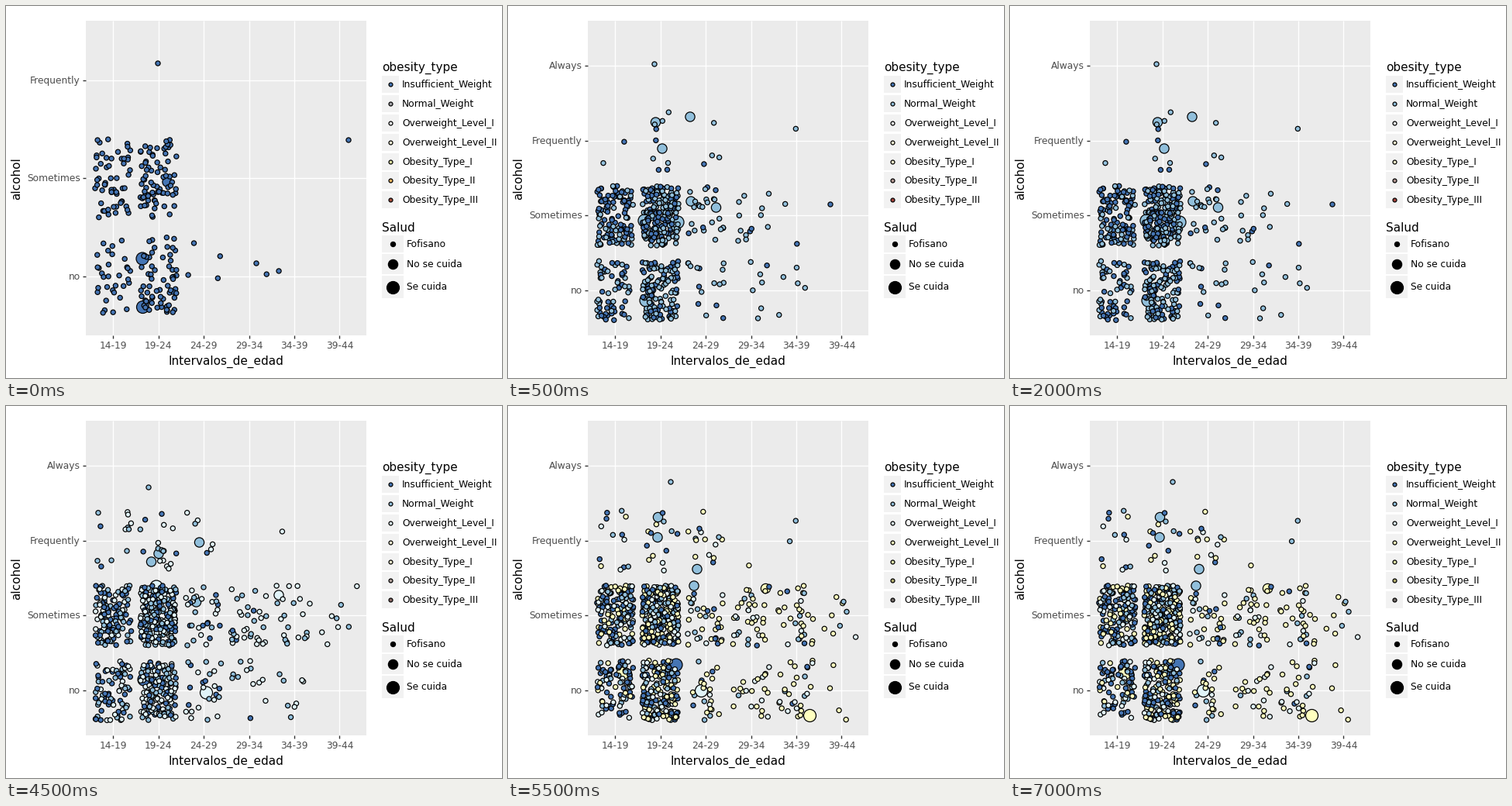
A matplotlib script that plays this animation: 640 by 480 pixels, repeating every 8 s.

```python
import numpy as np
import matplotlib.pyplot as plt
from matplotlib.animation import FuncAnimation
from matplotlib.patches import Rectangle

W, H, DPI = 640, 480, 100
PX = 72 / DPI                      # points per pixel
LEFT, TOP, RIGHT, BOTTOM = 103, 19, 465, 425
STEP = 58.45                       # distance between age groups
BLUE, SKY, ICE, CREAM = "#4575b4", "#91bfdb", "#e0f3f8", "#ffffbf"
TINTS = np.array([BLUE, SKY, ICE, CREAM])
KEY, SMALL, MEDIUM, LARGE = 4.92, 6.15, 12.24, 16
EDGE = dict(markeredgecolor="black", markeredgewidth=0.886)
LEVELS = ["no", "Sometimes", "Frequently", "Always"]
AGES = ["14-19", "19-24", "24-29", "29-34", "34-39", "39-44"]
TYPES = ["Insufficient_Weight", "Normal_Weight", "Overweight_Level_I",
         "Overweight_Level_II", "Obesity_Type_I", "Obesity_Type_II",
         "Obesity_Type_III"]
ROWS_3 = np.linspace(349, 95.8, 3)
ROWS_4 = np.linspace(367, 77.2, 4)


def age_x(i):
    return 138.2 + STEP * i


def key_y(i):
    return 101.4 + 24.8 * i


def label(ax, x, y, text, size=8.8, color="black", **kw):
    kw = {"ha": "left", "va": "center_baseline", **kw}
    return ax.text(x, y, text, fontsize=size, color=color, **kw)


def line(ax, xs, ys, color):
    return ax.plot(xs, ys, color=color, lw=1, zorder=2,
                   solid_capstyle="butt")[0]


def box(ax, x, y, w, h, color):
    ax.add_patch(Rectangle((x, y), w, h, fc=color, lw=0, zorder=1))


def key_dot(ax, x, y, size, color):
    return ax.plot([x], [y], "o", markersize=size * PX, color=color,
                   zorder=3, **EDGE)[0]


def draw_dots(ax, rows, seed, counts, young, old, marks):
    """Jitter counts[level][age] dots per cell over the few fixed marks.

    The tint shares blend from young to old along the age axis.
    """
    rng = np.random.default_rng(seed)
    reach = 0.4 * np.array([STEP, rows[0] - rows[1]])
    xy = [np.array([m[:2] for m in marks])]
    tints = [np.array([m[2] for m in marks])]
    sizes = [np.array([m[3] for m in marks])]
    for level, per_age in enumerate(counts):
        for age, n in enumerate(per_age):
            t = min(age / 3, 1)
            share = (1 - t) * np.array(young) + t * np.array(old)
            pick = rng.choice(len(share), n, p=share / share.sum())
            jitter = rng.uniform(-1, 1, (n, 2)) * reach
            xy.append(jitter + [age_x(age), rows[level]])
            tints.append(TINTS[pick])
            sizes.append(np.full(n, SMALL))
    xy = np.concatenate(xy)
    return ax.scatter(xy[:, 0], xy[:, 1],
                      s=(np.concatenate(sizes) * PX) ** 2,
                      c=np.concatenate(tints), edgecolors="black",
                      linewidths=0.886, zorder=3)


def draw_rows(ax, rows):
    parts = []
    for y, name in zip(rows, LEVELS):
        parts += [line(ax, [LEFT, RIGHT], [y, y], "white"),
                  line(ax, [LEFT - 4, LEFT], [y, y], "#333333"),
                  label(ax, 96, y - 1, name, color="#4d4d4d", ha="right")]
    return parts


def draw_frame(ax):
    box(ax, LEFT, TOP, RIGHT - LEFT, BOTTOM - TOP, "#ebebeb")
    for i, name in enumerate(AGES):
        x = age_x(i)
        line(ax, [x, x], [TOP, BOTTOM], "white")
        line(ax, [x, x], [BOTTOM, BOTTOM + 4], "#333333")
        label(ax, x, 437.5, name, color="#4d4d4d", ha="center")
    label(ax, 284, 457, "Intervalos_de_edad", 11, ha="center")
    label(ax, 13.5, 222.5, "alcohol", 11, ha="center", va="center",
          rotation=90)


def draw_legend(ax):
    label(ax, 485.5, 78, "obesity_type", 11)
    for i, name in enumerate(TYPES):
        box(ax, 485, key_y(i) - 11, 22, 22, "#f2f2f2")
        label(ax, 511, key_y(i) - 1, name)
    label(ax, 485.5, 285, "Salud", 11)
    for y, h, size, name in [(307.3, 22, SMALL, "Fofisano"),
                             (333.3, 26, MEDIUM, "No se cuida"),
                             (362.5, 29, LARGE, "Se cuida")]:
        box(ax, 485, y - h / 2, 28, h, "#f2f2f2")
        key_dot(ax, 499.3, y, size, "black")
        label(ax, 517, y - 1, name)


def draw_swatches(ax, colors):
    return [key_dot(ax, 496.3, key_y(i), KEY, c)
            for i, c in enumerate(colors)]


SCENES = [
    dict(rows=ROWS_3, seed=4, young=[1], old=[1],
         counts=[[32, 66, 3, 1, 1], [56, 74]],
         marks=[(176, 326, BLUE, LARGE), (176.5, 388.5, BLUE, LARGE),
                (208, 227, BLUE, MEDIUM), (196, 74, BLUE, SMALL),
                (442, 173, BLUE, SMALL), (242.5, 306, BLUE, SMALL),
                (323, 332, BLUE, SMALL)]),
    dict(rows=ROWS_4, seed=12, young=[66, 34], old=[13, 87],
         counts=[[60, 125, 16, 7, 5], [115, 195, 24, 13, 2],
                 [2, 9, 4, 0, 1]],
         marks=[(176, 277, SKY, LARGE), (219, 279, SKY, LARGE),
                (178, 380, SKY, LARGE), (190.5, 150, SKY, MEDIUM),
                (235, 143, SKY, MEDIUM), (199, 184, SKY, MEDIUM),
                (236, 252, SKY, MEDIUM), (268.5, 260, SKY, MEDIUM),
                (189, 75, SKY, SMALL), (416, 256, BLUE, SMALL)]),
    dict(rows=ROWS_4, seed=23, young=[45, 27, 28], old=[6, 36, 58],
         counts=[[80, 150, 24, 12, 8], [135, 240, 30, 33, 21, 8],
                 [12, 17, 6, 0, 1]],
         marks=[(194, 233, ICE, LARGE), (258.5, 370, ICE, LARGE),
                (178, 353, BLUE, LARGE), (199, 356, SKY, LARGE),
                (187.5, 201, SKY, MEDIUM), (197, 190.5, SKY, MEDIUM),
                (249.5, 176, SKY, MEDIUM), (245.5, 253, SKY, MEDIUM),
                (352, 244, ICE, MEDIUM), (184, 105, SKY, SMALL)]),
    dict(rows=ROWS_4, seed=37, young=[38, 22, 20, 20], old=[4, 18, 23, 55],
         counts=[[85, 185, 23, 22, 27, 4], [165, 310, 34, 35, 30, 9],
                 [13, 13, 14, 1, 2]],
         marks=[(249.5, 367.5, ICE, LARGE), (389.5, 399.5, CREAM, LARGE),
                (148, 345, CREAM, LARGE), (217, 334, BLUE, LARGE),
                (193.5, 143.5, SKY, MEDIUM), (193, 169.5, SKY, MEDIUM),
                (244, 210.5, SKY, MEDIUM), (240, 232, SKY, MEDIUM),
                (332.5, 235.5, CREAM, MEDIUM), (210, 98, SKY, SMALL)]),
]
SWATCHES = [
    [BLUE, "#a3a3a8", "#f4f8f8", "#fdfbd8", "#dfe3a0", "#f0b45c", "#a8503c"],
    [BLUE, SKY, "#f4f8f8", "#fffbd5", "#f8f3cc", "#b59a94", "#a8453c"],
    [BLUE, SKY, ICE, "#fffbd5", "#f3f0cc", "#b0a09a", "#8c6a66"],
    [BLUE, SKY, ICE, CREAM, "#dfe6a8", "#b5b070", "#77706c"],
]

plt.rcParams["font.family"] = "DejaVu Sans"
fig = plt.figure(figsize=(W / DPI, H / DPI), dpi=DPI, facecolor="white")
ax = fig.add_axes([0, 0, 1, 1])
ax.axis("off")
draw_frame(ax)
draw_legend(ax)
scenes = [[draw_dots(ax, **spec)] + draw_swatches(ax, colors)
          + draw_rows(ax, spec["rows"])
          for spec, colors in zip(SCENES, SWATCHES)]
ax.set_xlim(0, W)
ax.set_ylim(H, 0)


def update(i):
    current = (i + 4) // 5         # the opening scene lasts a single step
    for k, scene in enumerate(scenes):
        for part in scene:
            part.set_visible(k == current)
    return scenes[current]


anim = FuncAnimation(fig, update, frames=16, interval=500, repeat=True,
                     repeat_delay=0, blit=False)
plt.show()
```
